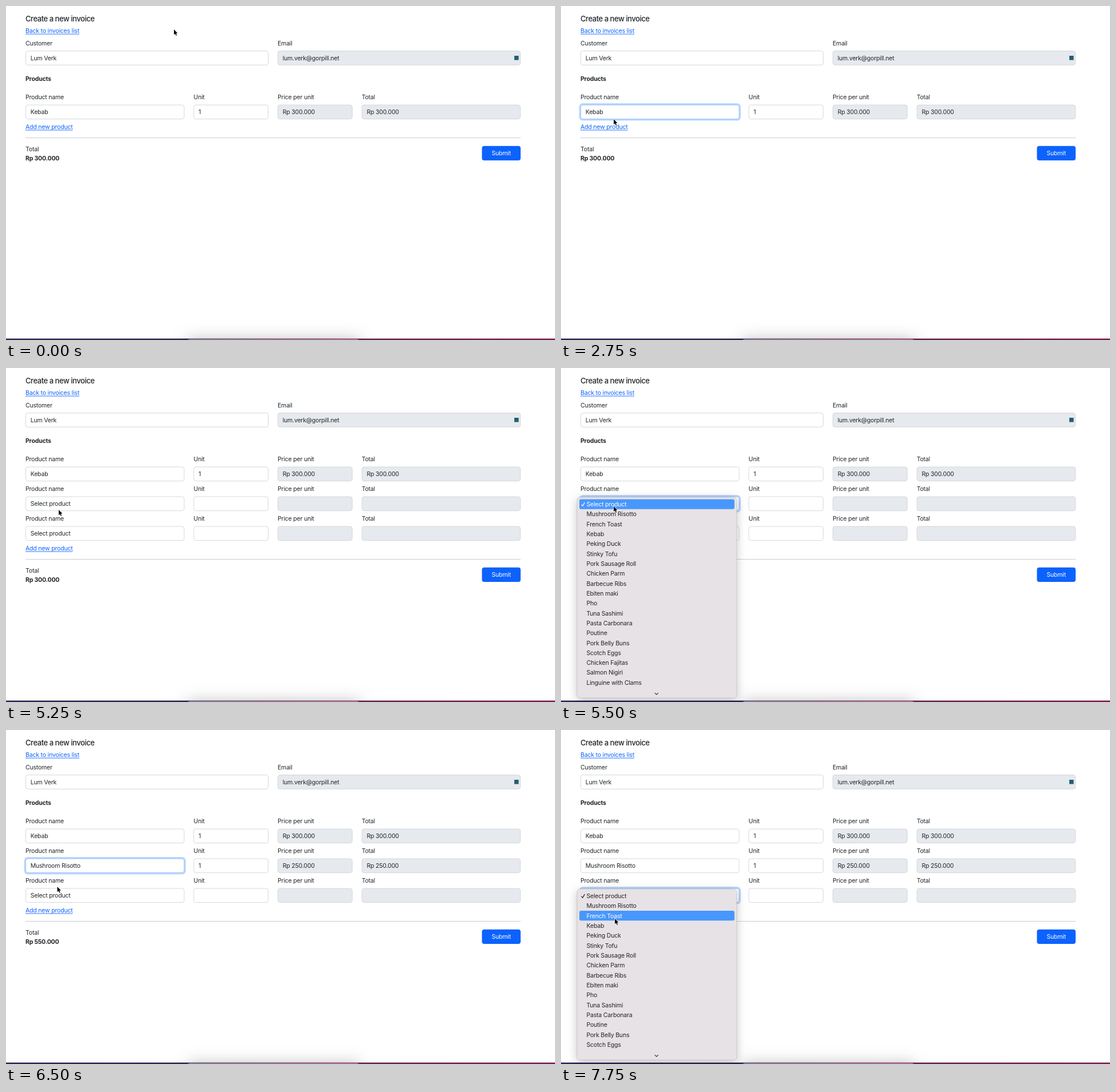
An HTML page with a canvas for the animation above (8 s loop, 958x584 px).

```html
<!DOCTYPE html>
<html lang="en">
<head>
<meta charset="utf-8">
<title>Create a new invoice</title>
<style>
html, body { margin: 0; width: 100%; height: 100%; overflow: hidden; background: #fff; }
canvas { display: block; width: 958px; height: 584px; }
</style>
</head>
<body>
<canvas id="stage"></canvas>
<script>
const W = 958, H = 584, LOOP = 8000, STEP = 250, ROW = 52;
const canvas = document.getElementById('stage');
const ctx = canvas.getContext('2d');
const dpr = window.devicePixelRatio || 1;
canvas.width = W * dpr;
canvas.height = H * dpr;

const INK = '#212529', BLUE = '#0c62fd';
const COLS = [
  { label: 'Product name', x: 34, w: 277.3 },
  { label: 'Unit', x: 327.3, w: 130.6 },
  { label: 'Price per unit', x: 474, w: 130.6, off: true },
  { label: 'Total', x: 620.7, w: 277.3, off: true }
];
const DISHES = ['Select product', 'Mushroom Risotto', 'French Toast', 'Kebab', 'Peking Duck',
  'Stinky Tofu', 'Pork Sausage Roll', 'Chicken Parm', 'Barbecue Ribs', 'Ebiten maki', 'Pho',
  'Tuna Sashimi', 'Pasta Carbonara', 'Poutine', 'Pork Belly Buns', 'Scotch Eggs',
  'Chicken Fajitas', 'Salmon Nigiri', 'Linguine with Clams'];

// Pointer stops: time, x, y
const PATH = [
  [0, 293, 41], [250, 270, 66], [500, 205, 122], [750, 167, 146], [1000, 159, 150],
  [1500, 159, 150], [1750, 158.5, 162.5], [2750, 92, 198], [3250, 85, 207], [3500, 85, 210],
  [3750, 85.5, 253], [4250, 84, 261], [4500, 84, 261], [5000, 90, 255], [5250, 92, 248],
  [5500, 92, 242], [5750, 91, 244], [6000, 90, 256], [6250, 90, 264], [6500, 89.5, 274],
  [7000, 89, 289], [7250, 91, 294], [7500, 93, 312], [7750, 94, 330]
];

function pointerAt(t) {
  const i = PATH.findIndex(p => p[0] > t);
  if (i < 0) return PATH[PATH.length - 1].slice(1);
  const [t0, x0, y0] = PATH[i - 1], [t1, x1, y1] = PATH[i];
  const k = (t - t0) / (t1 - t0);
  return [x0 + (x1 - x0) * k, y0 + (y1 - y0) * k];
}

function stateAt(t) {
  const s = { rows: t < 3500 ? 1 : t < 4500 ? 2 : 3, focus: -1, menu: null, picked: t >= 6500 };
  if (t >= 1750 && t < 3000) s.focus = 0;
  if (t >= 5500 && t < 7000) s.focus = 1;
  if (t >= 7000) s.focus = 2;
  if (t >= 5500 && t < 6500) s.menu = { row: 1, hot: t < 6000 ? 0 : 1, alpha: t < 6250 ? 1 : 0.8 };
  if (t >= 7000) s.menu = { row: 2, hot: t < 7500 ? 0 : t < 7750 ? 1 : 2, alpha: 1 };
  return s;
}

function text(str, x, mid, { color = INK, weight = 400, size = 10.5, track = -0.018, align = 'left' } = {}) {
  ctx.font = `${weight} ${size}px Inter, Roboto, sans-serif`;
  ctx.letterSpacing = `${size * track}px`;
  ctx.textAlign = align;
  ctx.fillStyle = color;
  ctx.fillText(str, x, mid + size * 0.37);
}

function link(str, x, mid) {
  text(str, x, mid, { color: BLUE });
  ctx.fillRect(x, mid + 5, ctx.measureText(str).width, 0.9);
}

function box(x, y, w, h, r, fill, stroke, line = 1) {
  ctx.beginPath();
  ctx.roundRect(x, y, w, h, r);
  if (fill) { ctx.fillStyle = fill; ctx.fill(); }
  if (stroke) { ctx.strokeStyle = stroke; ctx.lineWidth = line; ctx.stroke(); }
}

function field(x, y, w, value, off, focused) {
  if (focused) box(x - 1.1, y - 1.1, w + 2.2, 27.6, 5, null, 'rgba(13,110,253,.27)', 2.8);
  box(x + 0.4, y + 0.4, w - 0.8, 24.6, 3.8, off ? '#e6e9ed' : '#fff', focused ? '#86b7fe' : '#d0d4d9', 0.9);
  if (value) text(value, x + 8.7, y + 12.8);
}

function productRow(i, s) {
  const y = i * ROW;
  let values = ['Select product'];
  if (i === 0) values = ['Kebab', '1', 'Rp 300.000', 'Rp 300.000'];
  if (i === 1 && s.picked) values = ['Mushroom Risotto', '1', 'Rp 250.000', 'Rp 250.000'];
  COLS.forEach((c, n) => {
    text(c.label, c.x, y + 159.5);
    field(c.x, y + 172.6, c.w, values[n], c.off, n === 0 && s.focus === i);
  });
}

function polyline(color, width, ...pts) {
  ctx.beginPath();
  pts.forEach(([x, y]) => ctx.lineTo(x, y));
  ctx.strokeStyle = color;
  ctx.lineWidth = width;
  ctx.lineCap = ctx.lineJoin = 'round';
  ctx.stroke();
}

function menu({ row, hot, alpha }) {
  const first = 186 + row * ROW, top = first - 12, pitch = 17.33;
  ctx.save();
  ctx.globalAlpha = alpha;
  ctx.save();
  // Keep the shadow outside the translucent panel
  ctx.beginPath();
  ctx.rect(0, 0, W, H);
  ctx.roundRect(28, top, 278.5, 577 - top, 5);
  ctx.clip('evenodd');
  ctx.shadowColor = 'rgba(0,0,0,.24)';
  ctx.shadowBlur = 16 * dpr;
  ctx.shadowOffsetY = 4 * dpr;
  box(28, top, 278.5, 577 - top, 5, '#e7e3e5');
  ctx.restore();
  box(28, top, 278.5, 577 - top, 5, '#e7e2e5', 'rgba(0,0,0,.16)', 0.7);
  box(32, first + hot * pitch - 8.6, 270.7, 17.3, 3, '#4897fc');
  const ink = i => i === hot ? '#fff' : '#252325';
  for (let i = 0; i < DISHES.length && first + i * pitch < 560; i++)
    text(DISHES[i], 44.5, first + i * pitch, { color: ink(i) });
  polyline(ink(0), 1.2, [35.8, first + 1], [37.6, first + 3.4], [41.2, first - 2.6]);
  polyline('#333', 1.1, [164, 568.4], [166.7, 571], [169.4, 568.4]);
  ctx.restore();
}

function desktopEdge() {
  ctx.save();
  ctx.beginPath();
  ctx.rect(0, 540, W, 42);
  ctx.clip();
  ctx.shadowColor = 'rgba(0,0,0,.23)';
  ctx.shadowBlur = 26 * dpr;
  box(316, 582, 302, 30, 8, '#777');
  ctx.restore();
  const bar = ctx.createLinearGradient(0, 0, W, 0);
  bar.addColorStop(0, '#292452');
  bar.addColorStop(0.33, '#30224f');
  bar.addColorStop(0.65, '#65214f');
  bar.addColorStop(1, '#7a1c50');
  ctx.fillStyle = bar;
  ctx.fillRect(0, 581.5, W, 2.5);
  const dock = ctx.createLinearGradient(315, 0, 618, 0);
  dock.addColorStop(0, '#8a829c');
  dock.addColorStop(1, '#b67199');
  box(315, 582.3, 303, 12, 6, dock);
}

function pointer(x, y) {
  ctx.save();
  ctx.translate(x, y);
  ctx.beginPath();
  [[0, 0], [0, 9.2], [2.1, 7.3], [3.6, 10.8], [5.1, 10.2], [3.6, 6.8], [6.4, 6.6]]
    .forEach(([px, py]) => ctx.lineTo(px, py));
  ctx.closePath();
  ctx.lineJoin = 'round';
  ctx.strokeStyle = '#fff';
  ctx.lineWidth = 1.3;
  ctx.stroke();
  ctx.fillStyle = '#000';
  ctx.fill();
  ctx.restore();
}

function draw(t) {
  const s = stateAt(t), dy = (s.rows - 1) * ROW;
  ctx.setTransform(dpr, 0, 0, dpr, 0, 0);
  ctx.fillStyle = '#fff';
  ctx.fillRect(0, 0, W, H);

  text('Create a new invoice', 34, 22.2, { weight: 500, size: 13, track: -0.035 });
  link('Back to invoices list', 34, 43.6);
  text('Customer', 34, 65);
  field(34, 78.2, 424, 'Lum Verk');
  text('Email', 474, 65);
  field(474, 78.2, 424, 'lum.verk@gorpill.net', true);
  ctx.fillStyle = '#20606f';
  ctx.fillRect(887, 87, 7.5, 7.5);
  text('Products', 34, 127.6, { weight: 700 });

  for (let i = 0; i < s.rows; i++) productRow(i, s);

  link('Add new product', 34, 211.5 + dy);
  ctx.fillStyle = '#cbcdcf';
  ctx.fillRect(34, 230 + dy, 864, 1);
  text('Total', 34, 249.8 + dy);
  text(s.picked ? 'Rp 550.000' : 'Rp 300.000', 34, 265.7 + dy, { weight: 700 });
  box(830.5, 244.8 + dy, 67.5, 25.3, 4, BLUE);
  text('Submit', 864.2, 257.6 + dy, { color: '#fff', align: 'center' });

  desktopEdge();
  if (s.menu) menu(s.menu);
  pointer(...pointerAt(t));
}

const start = performance.now();
function tick() {
  const t = (performance.now() - start) % LOOP;
  draw(Math.floor(t / STEP) * STEP);
  requestAnimationFrame(tick);
}
tick();
</script>
</body>
</html>
```
